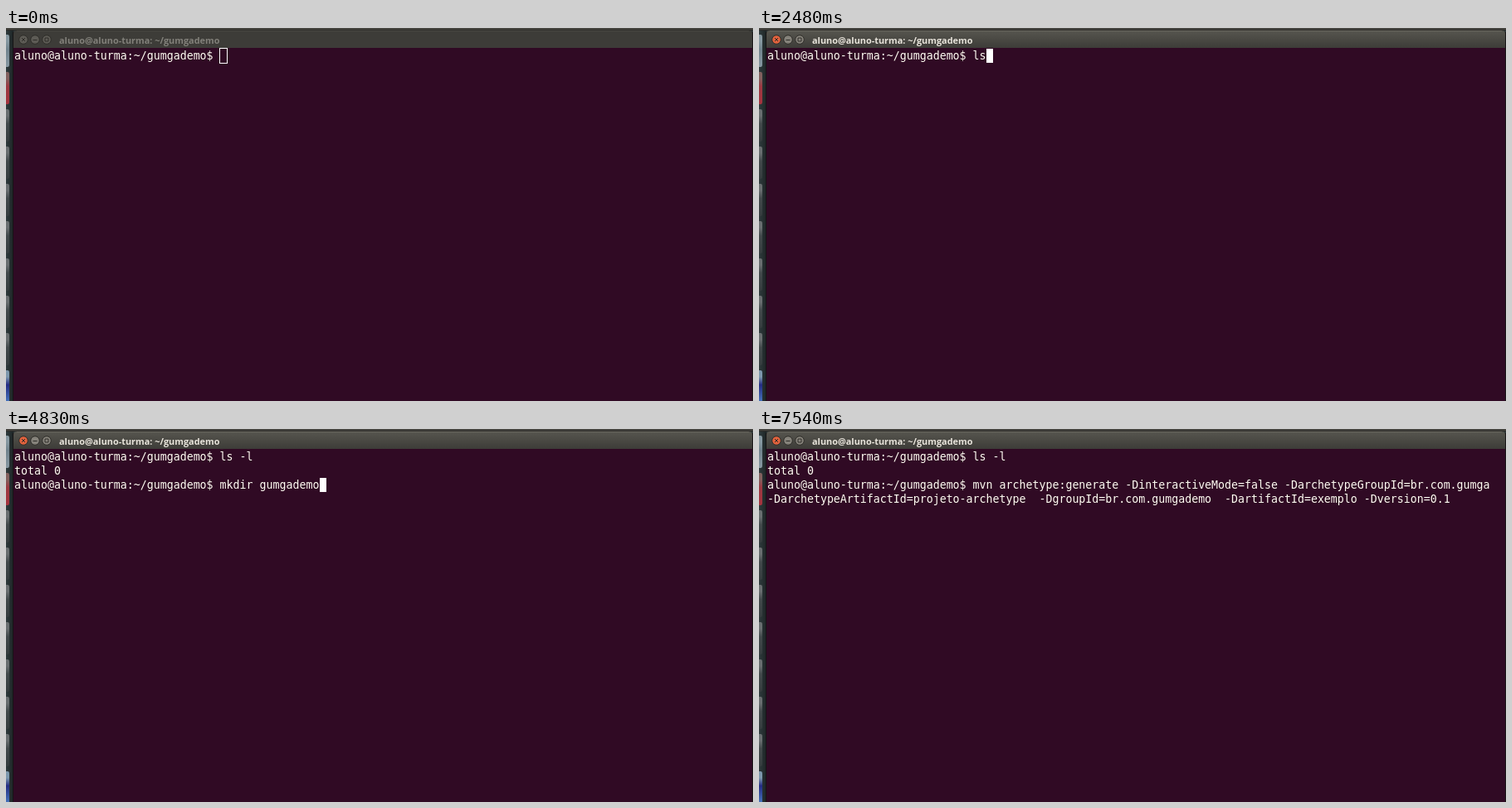
Write an HTML page that moves like this. It is 900x450 px and loops after 8 s.

```html
<!DOCTYPE html>
<html lang="pt">
<head>
<meta charset="utf-8">
<title>Terminal</title>
<style>
  html, body { margin: 0; width: 100%; height: 100%; overflow: hidden; background: #2c3536; }
  svg, pre, #cursor { position: absolute; left: 0; top: 0; }
  pre { margin: 0; left: 10px; top: 25px; color: #fffdf2;
        font: 13.288px/17px "DejaVu Sans Mono", monospace; }
  #title { font: bold 10.9px "Open Sans", sans-serif; }
  #cursor { box-sizing: border-box; background: #fff; }
  #cursor.hollow { background: none; border: 1px solid #fff; }
</style>
</head>
<body>
<svg width="900" height="450">
  <defs>
    <linearGradient id="active" x2="0" y2="1">
      <stop stop-color="#57564f"/><stop offset="1" stop-color="#3d3c38"/>
    </linearGradient>
    <linearGradient id="shade" x2="1" y2="0">
      <stop stop-color="#2f3b3d"/><stop offset="1" stop-color="#1d2425"/>
    </linearGradient>
  </defs>
  <rect width="900" height="3" fill="#44433e"/>
  <rect y="2" width="900" height="1" fill="#2d2c29"/>
  <rect y="3" width="9" height="447" fill="url(#shade)"/>
  <g id="launcher"></g>
  <rect x="8" y="5" width="892" height="445" fill="#171516"/>
  <path id="bar" d="M9 24V7Q9 3 13 3H895Q899 3 899 7V24Z"/>
  <path id="shine" d="M13 3.5H895"/>
  <rect x="9" y="24" width="890" height="426" fill="#300a24"/>
  <g id="buttons" stroke="#2e2d29"></g>
  <text id="title" x="64" y="19">aluno@aluno-turma: ~/gumgademo</text>
  <g id="pointer" fill="none">
    <path d="M-3 -6.5H3M-3 6.5H3M0 -6V6" stroke="#000" stroke-width="3" opacity=".55"/>
    <path d="M-2.5 -6.5H2.5M-2.5 6.5H2.5M0 -6V6" stroke="#fff"/>
  </g>
</svg>
<pre id="screen"></pre>
<div id="cursor"></div>
<script>
const $ = id => document.getElementById(id);
const LOOP = 8000, CELL = 8, ROW = 17, FOCUS = 1270;

// Launcher tiles: top, middle and bottom colour
const grey = ['#696e70', '#42494b', '#353c3e'];
const tiles = [['#8698a1', '#71838d', '#8798a2'], ['#82605e', '#9c3942', '#a5333e'],
  ...Array(7).fill(grey), ['#7d98ad', '#252d84', '#4878bf']];
$('launcher').innerHTML = tiles.map(([top, mid, low], i) => {
  const y = 8 + i * 45;
  return `<linearGradient id="tile${i}" x2="0" y2="1"><stop stop-color="${top}"/>
    <stop offset=".2" stop-color="${top}"/><stop offset=".45" stop-color="${mid}"/>
    <stop offset="1" stop-color="${low}"/></linearGradient>
    <path d="M0 ${y}H2Q4 ${y} 4 ${y + 3}V${y + 36}Q4 ${y + 39} 2 ${y + 39}H0Z" fill="url(#tile${i})"/>`;
}).join('');

const marks = ['M-2 -2L2 2M2 -2L-2 2', 'M-2.5 .5H2.5', 'M-2 -2H2V2H-2Z'];
$('buttons').innerHTML = marks.map((d, i) =>
  `<g transform="translate(${21 + i * 14} 14)"><circle r="5.3"/><path d="${d}" fill="none"/></g>`).join('');
const discs = document.querySelectorAll('#buttons circle');

const prompt = 'aluno@aluno-turma:~/gumgademo$ ';
const listed = prompt + 'ls -l\ntotal 0\n' + prompt;
const command = 'mvn archetype:generate -DinteractiveMode=false -DarchetypeGroupId=br.com.gumga\n' +
  '-DarchetypeArtifactId=projeto-archetype  -DgroupId=br.com.gumgademo  -DartifactId=exemplo -Dversion=0.1';

// Start time and terminal content
const steps = [
  [0, prompt], [2400, prompt + 'l'], [2480, prompt + 'ls'], [2560, prompt + 'ls '],
  [2630, prompt + 'ls -'], [2700, prompt + 'ls -l'], [3020, listed],
  [4470, listed + 'ls -l'], [4660, listed + 'clear'],
  [4830, listed + 'mkdir gumgademo'], [4950, listed + 'ls -l exemplo/'],
  [5280, listed + 'ls -l'], [5460, listed + 'clear'], [5780, listed + command]
];
const blinkOff = [[1840, 2330], [3630, 4190], [6350, 6980], [7540, LOOP]];

function drawWindow(focused) {
  $('bar').setAttribute('fill', focused ? 'url(#active)' : '#3d3c38');
  $('shine').setAttribute('stroke', focused ? '#69675f' : '#494843');
  $('title').setAttribute('fill', focused ? '#e8e4db' : '#82807a');
  discs.forEach((disc, i) =>
    disc.setAttribute('fill', !focused ? '#5d5b55' : i ? '#85827a' : '#e2623d'));
}

function drawPointer(t) {
  const visible = t >= 860 && t < 2330;
  $('pointer').style.display = visible ? '' : 'none';
  const progress = Math.min(1, Math.floor((t - 860) / 40) / 8);
  const left = (1 - progress) ** 2;
  $('pointer').setAttribute('transform',
    `translate(${Math.round(682 + 60 * left) + .5} ${Math.round(280 + 160 * left)})`);
}

function drawTerminal(t, focused) {
  const text = steps.findLast(([start]) => t >= start)[1];
  if ($('screen').textContent !== text) $('screen').textContent = text;
  const lines = text.split('\n');
  const grow = focused ? 0 : 1;
  const cursor = $('cursor');
  cursor.className = focused ? '' : 'hollow';
  Object.assign(cursor.style, {
    left: 10 + lines.at(-1).length * CELL - grow + 'px',
    top: 25 + (lines.length - 1) * ROW - grow + 'px',
    width: CELL + 2 * grow + 'px',
    height: ROW + 2 * grow + 'px',
    display: blinkOff.some(([from, to]) => t >= from && t < to) ? 'none' : ''
  });
}

function render(now) {
  const t = now % LOOP, focused = t >= FOCUS;
  drawWindow(focused);
  drawPointer(t);
  drawTerminal(t, focused);
}

const began = performance.now();
function tick() {
  render(performance.now() - began);
  requestAnimationFrame(tick);
}
tick();
</script>
</body>
</html>
```
